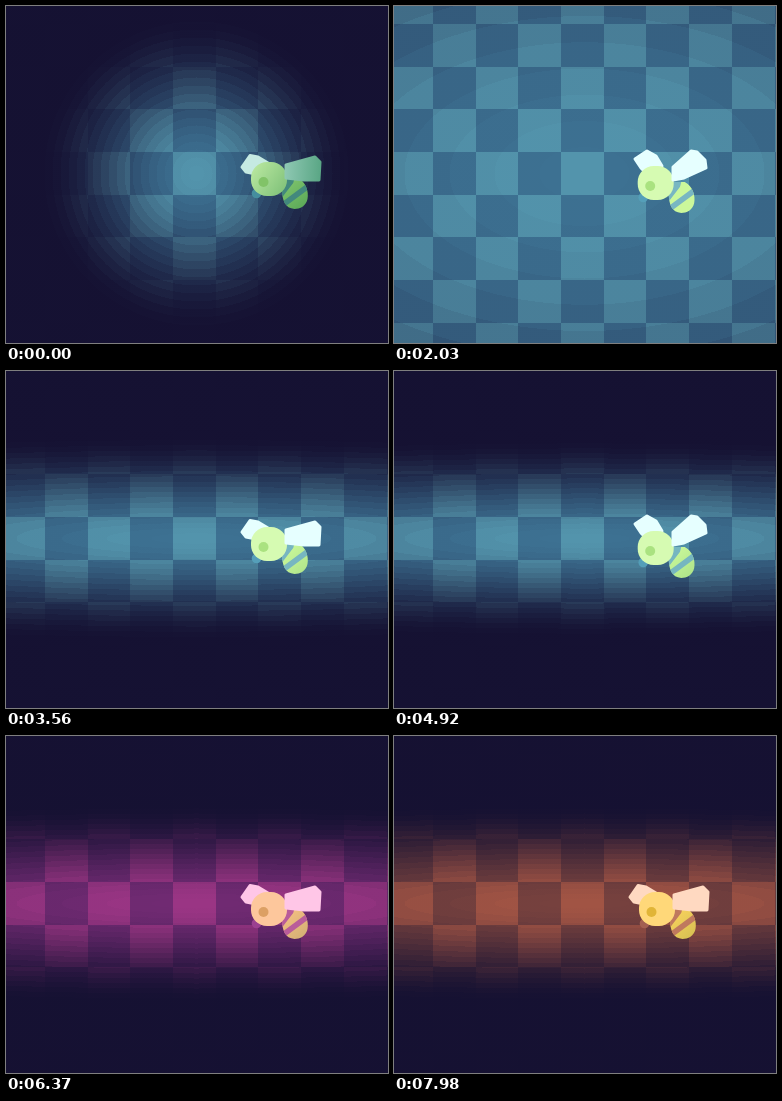
Recreate the animation shown at these times as an HTML page with a canvas. Size 382 by 337 pixels, loop 8000 ms.

```html
<!DOCTYPE html>
<html lang="en">
<head>
<meta charset="utf-8">
<title>Bee under a light</title>
<style>
  html, body { margin: 0; width: 100%; height: 100%; overflow: hidden; background: #151132; }
  canvas { display: block; width: 382px; height: 337px; }
</style>
</head>
<body>
<canvas id="stage" width="382" height="337"></canvas>
<script>
const LOOP = 8000, W = 382, H = 337, CELL = 42.7;
const CX = 190.5, CY = 167.5;
const DARK = '21,17,50';
const ctx = document.getElementById('stage').getContext('2d');

// Colour of a light floor cell at full light over time
const BLUE = [83, 148, 172];
const TINT = [
  [0, BLUE], [5190, BLUE],
  [5910, [79, 152, 138]], [6000, [79, 152, 138]],
  [6180, [100, 75, 180]],
  [6370, [154, 53, 132]],
  [7100, [161, 84, 68]], [LOOP, [161, 84, 68]]
];

// Bee parts under the blue light: colour, and how far they follow the tint
const PARTS = {
  head:   [[214, 251, 178], .55],
  cheek:  [[170, 226, 128], .7],
  wing:   [[230, 255, 255], .6],
  body:   [[203, 248, 155], .6],
  stripe: [[120, 183, 194], .95],
  foot:   [[85, 159, 185], 1]
};

const WINGS = [
  { left: [236, 161, 244, 149.5, 252, 151, 262, 157, 250, 168, 240, 166],
    right: [280, 159, 309, 151, 314, 156, 313, 174, 298, 174, 280, 172] },
  { left: [241, 153, 253, 145, 262, 150, 268, 160, 252, 167, 247, 162],
    right: [279, 161, 297, 145, 303, 146, 311, 154, 312, 162, 290, 172, 279, 174] }
];

const clamp = v => Math.max(0, Math.min(1, v));
const ramp = (t, a, b) => clamp((t - a) / (b - a));
const mix = (a, b, k) => a + (b - a) * k;
const mixRGB = (a, b, k) => a.map((v, i) => mix(v, b[i], k));
const rgb = c => `rgb(${c.map(Math.round).join()})`;
const fade = r => (1 + Math.cos(Math.PI * clamp(r))) / 2;

function tintAt(t) {
  const n = TINT.findIndex(k => k[0] > t);
  const [a, from] = TINT[n - 1], [b, to] = TINT[n];
  return mixRGB(from, to, ramp(t, a, b));
}

function radii(t) {
  const rx = mix(160, 900, ramp(t, 630, 1170));
  if (t < 2030) return [rx, 160];
  return [rx, t < 2210 ? 525 : 100 + 232 * Math.exp((2210 - t) / 323)];
}

// Wings change pose on an 11 fps clock, four times in every seven ticks
function poseAt(t) {
  const tick = Math.floor((t - 78) * .011);
  return (Math.floor((tick + .3) / 1.75) + 1) % 2;
}

function drawFloor(light) {
  const dark = [light[0] * .73, light[1] * .75 + 2, light[2] * .8 + 8];
  ctx.fillStyle = rgb(dark);
  ctx.fillRect(0, 0, W, H);
  ctx.fillStyle = rgb(light);
  const edge = (o, i) => Math.round(o + i * CELL);
  for (let j = -4; j <= 4; j++)
    for (let i = -5; i <= 5; i++)
      if ((i + j) % 2 === 0) {
        const x = edge(167, i), y = edge(146, j);
        ctx.fillRect(x, y, edge(167, i + 1) - x, edge(146, j + 1) - y);
      }
}

function drawShade(rx, ry) {
  const g = ctx.createRadialGradient(0, 0, 0, 0, 0, 1), n = 20;
  for (let i = 0; i < n; i++) {
    const c = `rgba(${DARK},${1 - fade((i + .4) / n)})`;
    g.addColorStop(i / n, c);
    g.addColorStop((i + 1) / n, c);
  }
  ctx.save();
  ctx.translate(CX, CY);
  ctx.scale(rx, ry);
  ctx.fillStyle = g;
  ctx.fillRect(-200 / rx, -170 / ry, 400 / rx, 340 / ry);
  ctx.restore();
}

function poly(pts, fill) {
  ctx.beginPath();
  for (let i = 0; i < pts.length; i += 2) ctx.lineTo(pts[i], pts[i + 1]);
  ctx.closePath();
  ctx.fillStyle = ctx.strokeStyle = fill;
  ctx.lineWidth = 3;
  ctx.lineJoin = 'round';
  ctx.fill();
  ctx.stroke();
}

function oval(x, y, r, fill) {
  ctx.beginPath();
  ctx.arc(x, y, r, 0, 7);
  ctx.fillStyle = fill;
  ctx.fill();
}

function drawAbdomen(body, stripe) {
  ctx.save();
  ctx.beginPath();
  ctx.moveTo(274, 172);
  ctx.lineTo(292, 172);
  ctx.bezierCurveTo(300, 176, 303, 186, 301.5, 193);
  ctx.bezierCurveTo(300, 200, 294, 203, 288.5, 203);
  ctx.bezierCurveTo(279, 202, 276, 195, 276, 182);
  ctx.clip();
  ctx.fillStyle = body;
  ctx.fillRect(270, 168, 36, 38);
  poly([270, 168, 288, 168, 286, 176, 276, 189, 271, 193], stripe);
  ctx.beginPath();
  ctx.moveTo(274, 201);
  ctx.lineTo(305, 178);
  ctx.lineWidth = 5.5;
  ctx.stroke();
  ctx.restore();
}

function drawBee(pose, light, rx, ry) {
  // Colour of a part as lit at a point
  const lit = (name, x, y) => {
    const [base, follow] = PARTS[name];
    const glow = clamp(1.1 * fade(Math.hypot((x - CX) / rx, (y - CY) / ry)));
    const dim = mixRGB([.3, .6, .45], [1, 1, 1], glow);
    return rgb(base.map((v, i) => clamp((v + follow * (light[i] - BLUE[i])) / 255) * 255 * dim[i]));
  };
  const blend = (name, x1, y1, x2, y2) => {
    const g = ctx.createLinearGradient(x1, y1, x2, y2);
    g.addColorStop(0, lit(name, x1, y1));
    g.addColorStop(1, lit(name, x2, y2));
    return g;
  };
  const { left, right } = WINGS[pose];
  const shift = pose ? [-1.3, 4] : [0, 0];

  ctx.save();
  ctx.translate(...shift);
  oval(250.5, 187.5, 4.8, lit('foot', 250, 187));
  ctx.restore();
  poly(left, lit('wing', 246, 158));
  ctx.save();
  ctx.translate(...shift);
  drawAbdomen(blend('body', 278, 176, 298, 200), lit('stripe', 287, 186));
  ctx.beginPath();
  ctx.roundRect(245, 156, 36, 34, 16);
  ctx.fillStyle = blend('head', 247, 162, 279, 184);
  ctx.fill();
  oval(257.5, 176, 5, lit('cheek', 260, 176));
  ctx.restore();
  poly(right, blend('wing', 278, 162, 314, 164));
}

function draw(t) {
  const light = tintAt(t), [rx, ry] = radii(t);
  drawFloor(light);
  drawShade(rx, ry);
  drawBee(poseAt(t), light, rx, ry);
}

const start = performance.now();
function tick() {
  draw((performance.now() - start) % LOOP);
  requestAnimationFrame(tick);
}
tick();
</script>
</body>
</html>
```
